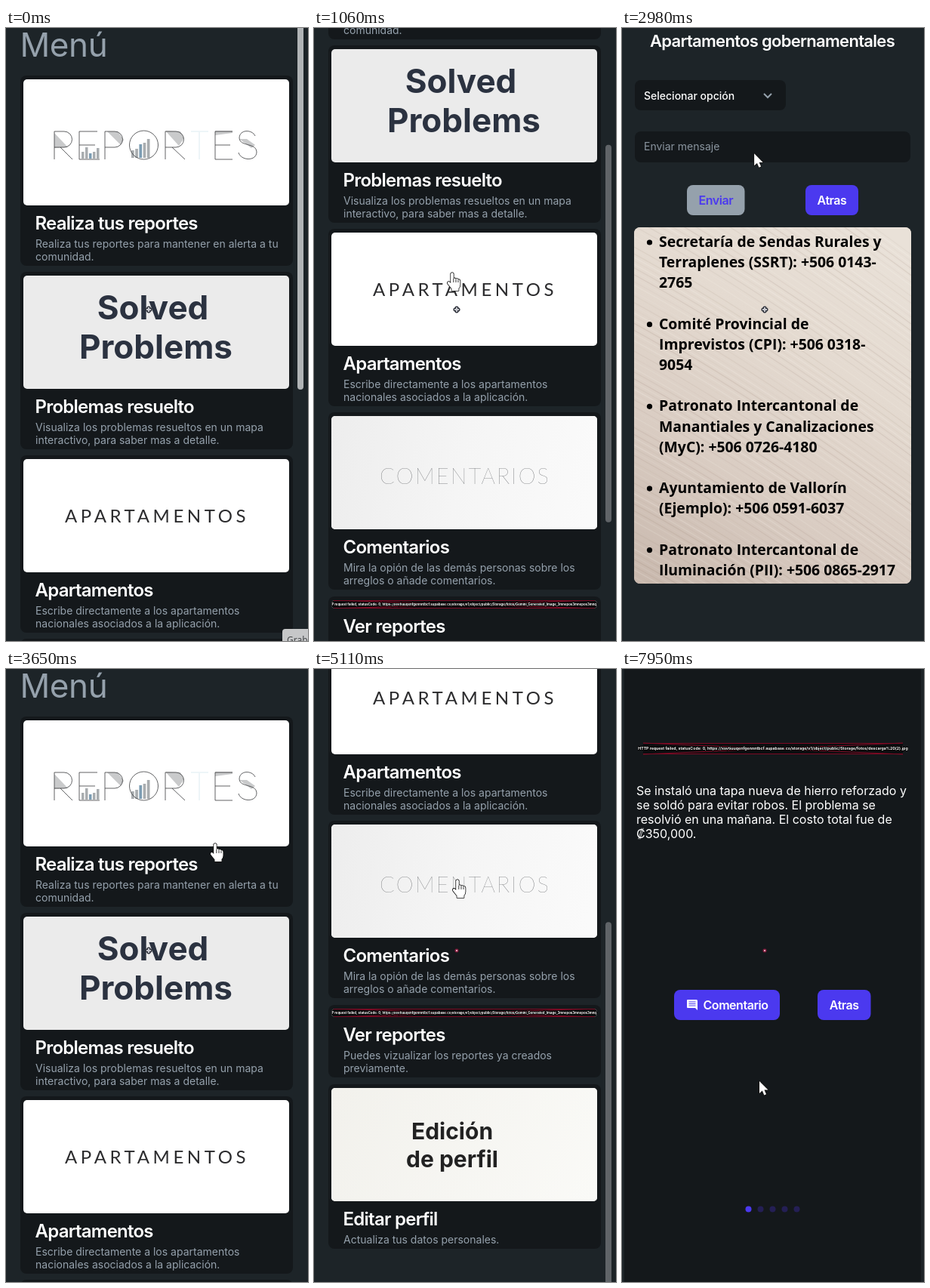
These frames come from a looping animation (400x812 px, 8000 ms). An HTML page with a canvas:

```html
<!DOCTYPE html>
<html lang="es">
<head>
<meta charset="utf-8">
<title>Menú</title>
<style>
html, body { margin: 0; width: 100%; height: 100%; overflow: hidden; background: #1d2428; }
canvas { display: block; }
</style>
</head>
<body>
<canvas id="stage" width="400" height="812"></canvas>
<script>
const ctx = document.getElementById('stage').getContext('2d');
const W = 400, H = 812, LOOP = 8000;
const BG = '#1d2428', CARD = '#14181b', GREY = '#95a1ac', BLUE = '#4b39ef', INK = '#2b3240';
const STORAGE = 'HTTP request failed, statusCode: 0, https://xsvtiuuqenfgennntbcf.supabase.co/storage/v1/object/public/Storage/fotos/';

// Times at which the menu list jumps to a new offset
const SCROLL = [[0, 0], [640, 100], [780, 200], [920, 300], [3650, 0], [3800, 100], [3920, 200],
  [4020, 300], [4140, 400], [4400, 500], [4550, 600], [4620, 608]];

// Pointer path: time, x, y
const PATH = [[470, 420, 600], [760, 190, 350], [850, 183, 324], [1060, 183, 324], [1260, 178, 330],
  [1400, 137, 322], [1590, 165, 340], [2050, 165, 340], [2300, 220, 470], [2500, 110, 420],
  [2710, 45, 333], [2950, 140, 170], [3100, 310, 152], [3260, 277, 231], [3700, 277, 231],
  [4180, 265, 235], [4320, 265, 235], [4700, 240, 250], [5110, 190, 278], [5310, 187, 470],
  [5970, 187, 470], [6170, 72, 172], [6300, 120, 119], [6450, 242, 220], [6620, 235, 450],
  [6760, 178, 678], [7030, 186, 720], [7220, 186, 720], [7500, 190, 650], [7800, 176, 570],
  [7950, 182, 546]];

const CARDS = [
  { y: 68, h: 167, art: reportsArt, title: 'Realiza tus reportes',
    lines: ['Realiza tus reportes para mantener en alerta a tu', 'comunidad.'] },
  { y: 328, h: 150, art: solvedArt, title: 'Problemas resuelto',
    lines: ['Visualiza los problemas resueltos en un mapa', 'interactivo, para saber mas a detalle.'] },
  { y: 571, h: 150, art: officesArt, title: 'Apartamentos',
    lines: ['Escribe directamente a los apartamentos', 'nacionales asociados a la aplicación.'] },
  { y: 814, h: 150, art: commentsArt, title: 'Comentarios',
    lines: ['Mira la opión de las demás personas sobre los', 'arreglos o añade comentarios.'] },
  { y: 1058, h: 11, art: brokenArt, title: 'Ver reportes',
    lines: ['Puedes vizualizar los reportes ya creados', 'previamente.'] },
  { y: 1163, h: 150, art: profileArt, title: 'Editar perfil',
    lines: ['Actualiza tus datos personales.'] }
];

const CONTACTS = [
  ['Secretaría de Sendas Rurales y', 'Terraplenes (SSRT): +506 0143-', '2765'],
  ['Comité Provincial de', 'Imprevistos (CPI): +506 0318-', '9054'],
  ['Patronato Intercantonal de', 'Manantiales y Canalizaciones', '(MyC): +506 0726-4180'],
  ['Ayuntamiento de Vallorín', '(Ejemplo): +506 0591-6037'],
  ['Patronato Intercantonal de', 'Iluminación (PII): +506 0865-2917']
];

const BUTTONS = {
  contacts: [[17, 69, 200, 40], [86, 208, 76.5, 40], [243, 208, 70, 40]],
  report: [[69, 425, 140, 40], [259, 425, 70.5, 40]]
};

const clamp = v => Math.max(0, Math.min(1, v));

function text(s, x, y, size, color, { weight = 400, track = 0, align = 'left', family = 'Inter' } = {}) {
  ctx.font = `${weight} ${size}px "${family}", sans-serif`;
  ctx.letterSpacing = track + 'px';
  ctx.textAlign = align;
  ctx.fillStyle = color;
  ctx.fillText(s, x, y);
}

function box(x, y, w, h, r, fill) {
  ctx.beginPath();
  ctx.roundRect(x, y, w, h, r);
  ctx.fillStyle = fill;
  ctx.fill();
}

function poly(points, fill) {
  ctx.beginPath();
  points.forEach(([x, y]) => ctx.lineTo(x, y));
  ctx.fillStyle = fill;
  ctx.fill();
}

function stroke(d, color, width) {
  ctx.strokeStyle = color;
  ctx.lineWidth = width;
  ctx.stroke(new Path2D(d));
}

function shade(x0, y0, x1, y1, ...colors) {
  const g = ctx.createLinearGradient(x0, y0, x1, y1);
  colors.forEach((c, i) => g.addColorStop(i / (colors.length - 1), c));
  return g;
}

function clipped(x, y, w, h, r, fill, draw) {
  ctx.save();
  box(x, y, w, h, r, fill);
  ctx.clip();
  draw();
  ctx.restore();
}

/* Card artwork; y is the top of the picture */

function bars(x, base, step, heights) {
  heights.forEach((h, i) => {
    ctx.fillStyle = i % 3 === 2 ? '#7d9db3' : '#a9adb0';
    ctx.fillRect(x + i * step, base - h, step - 1.5, h);
  });
}

function reportsArt(y) {
  ctx.save();
  ctx.translate(0, y + 68);
  const grey = '#c9cacb';
  poly([[64, 3], [64, 23], [82, 22]], grey);
  poly([[134, 1], [148, 1], [156, 12], [152, 19]], grey);
  poly([[211, 0], [231, 1], [236, 10], [229, 20]], grey);
  poly([[277, 0], [300, 0], [300, 3], [277, 6]], grey);
  poly([[309, 11], [319, 11], [330, 19], [325, 23]], grey);
  bars(100, 37, 5, [9, 15, 7, 9, 14]);
  bars(166, 36, 5.2, [10, 12, 18, 20, 25]);
  stroke('M256 2V38M245 1H268', '#dcebf1', 1);
  stroke('M64 38V1H77A10.5 10.5 0 0 1 77 22H64M72 22L88 38' +
    'M121 1H97V38M97 19H118M97 38H124' +
    'M131 38V1H144A10.5 10.5 0 0 1 144 22H131' +
    'M163.500 19a19 19 0 1 0 38 0a19 19 0 1 0 -38 0' +
    'M211 38V1H225A10.500 10.500 0 0 1 225 22H211M220 22L237 38' +
    'M300 1H277V38H300M277 19H297' +
    'M330 7C326 -2 309 -2 309 10C309 21 332 16 332 28C332 41 311 40 308 29', '#3a3c3e', 0.8);
  ctx.restore();
}

function solvedArt(y) {
  const style = { weight: 700, align: 'center' };
  text('Solved', 194.5, y + 58, 44, INK, style);
  text('Problems', 198.5, y + 110, 44, INK, style);
}

function officesArt(y) {
  text('APARTAMENTOS', 78, y + 84, 24, '#2c2c2e', { family: 'Lato', track: 4.6 });
}

function commentsArt(y) {
  box(23, y, 352, 150, 0, shade(23, y, 375, y + 60, '#ededed', '#f5f5f5', '#fafafa'));
  text('COMENTARIOS', 87, y + 89.5, 29, '#4b4e52', { family: 'Lato', weight: 200, track: 2.2 });
}

function brokenArt(y) {
  broken(23, y, 352, 11, 4.3, STORAGE + 'Gemini_Generated_Image_3mnepos3mnepos3mnq.png');
}

function profileArt(y) {
  box(23, y, 352, 150, 0, shade(23, y, 375, y + 150, '#f2f1ec', '#fafaf7'));
  const style = { weight: 700, align: 'center' };
  text('Edición', 183, y + 68, 30, '#222', style);
  text('de perfil', 183, y + 105, 30, '#222', style);
}

function broken(x, y, w, h, size, message) {
  box(x, y, w, h, 0, '#0c0d0f');
  const r = x + w, b = y + h;
  stroke(`M${x} ${y + .5}H${r}M${x} ${b - .5}H${r}M${x} ${y}L${r} ${b}M${r} ${y}L${x} ${b}`, '#7d0a24', 1.2);
  const mid = y + h / 2 + size * 0.36;
  ctx.font = `700 ${size}px Inter, sans-serif`;
  ctx.letterSpacing = '0px';
  ctx.textAlign = 'center';
  ctx.strokeStyle = '#000';
  ctx.lineWidth = 1.5;
  ctx.strokeText(message, x + w / 2, mid);
  text(message, x + w / 2, mid, size, '#fff', { weight: 700, align: 'center' });
}

/* Screens */

function fill(color) {
  ctx.fillStyle = color;
  ctx.fillRect(0, 0, W, H);
}

function button(label, [x, y, w, h], color = '#fff', back = BLUE, shift = 0) {
  box(x, y, w, h, 8, back);
  text(label, x + w / 2 + shift, y + 26, 16, color, { weight: 600, track: -0.45, align: 'center' });
}

function menu(t, scroll) {
  fill(BG);
  ctx.save();
  ctx.translate(0, -scroll);
  text('Menú', 18.5, 38, 44, GREY, { track: -0.4 });
  for (const { y, h, art, title, lines } of CARDS) {
    const end = y + h;
    box(19, y - 5, 361, h + 51 + 17 * lines.length, 8, CARD);
    clipped(23, y, 352, h, 5, art === solvedArt ? '#ebebeb' : '#fff', () => art(y));
    text(title, 38.5, end + 32, 24, '#fff', { weight: 600, track: -0.75 });
    lines.forEach((s, i) => text(s, 39, end + 56 + 17 * i, 14, GREY));
  }
  ctx.restore();

  let alpha = t < 3650 ? 1 - clamp((t - 1320) / 270) : 1 - clamp((t - 5180) / 190);
  if (t >= 3650 && t < 3800) alpha = 0;
  ctx.globalAlpha = alpha;
  box(386, -21 + scroll * 0.586, 8, 500, 4, t < 470 ? '#b1b4b6' : '#606468');
  ctx.globalAlpha = 1;

  if (t < 70) {
    box(366, 796, 50, 30, 4, '#c6c7c8');
    text('Grabar', 372, 815, 12, '#45484a', { family: 'Noto Sans' });
  }
}

function fabric() {
  box(16, 264, 367, 472, 0, shade(40, 736, 330, 264, '#c9b9ae', '#dacdc3', '#e4dad0', '#e9e1d8'));
  ctx.lineWidth = 1.4;
  for (let i = 0; i < 150; i++) {
    const y = 60 + i * 4.6;
    const a = 0.05 + 0.045 * Math.sin(i * 2.3) + 0.03 * Math.sin(i * 0.37);
    ctx.strokeStyle = i % 2 ? `rgba(255,250,244,${Math.max(0, a * 1.6)})` : `rgba(120,95,80,${Math.max(0, a)})`;
    ctx.beginPath();
    ctx.moveTo(16, y);
    ctx.quadraticCurveTo(180, y + 90, 383, y + 240);
    ctx.stroke();
  }
}

function contacts() {
  const [, send, back] = BUTTONS.contacts;
  fill(BG);
  text('Apartamentos gobernamentales', 199, 25, 22, '#fff', { weight: 600, track: -0.7, align: 'center' });
  box(17, 69, 200, 40, 8, CARD);
  text('Selecionar opción', 29, 95, 14, '#fff', { weight: 500 });
  stroke('M188 87L193 92L198 87', GREY, 2);
  box(17, 137, 365, 41, 8, CARD);
  text('Enviar mensaje', 29, 162, 14, '#8a959f');
  button('Enviar', send, BLUE, GREY);
  button('Atras', back);
  clipped(16, 264, 367, 472, 8, '#ded3c9', fabric);
  let y = 290;
  for (const lines of CONTACTS) {
    ctx.fillStyle = '#000';
    ctx.beginPath();
    ctx.arc(36.5, y - 6, 3.6, 0, 7);
    ctx.fill();
    for (const s of lines) {
      text(s, 49, y, 19.4, '#000', { weight: 700, family: 'Open Sans' });
      y += 27.17;
    }
    y += 27.17;
  }
}

function report(t) {
  const [comment, back] = BUTTONS.report;
  fill(BG);
  ctx.fillStyle = CARD;
  ctx.fillRect(3, 0, 393, H);
  if (t >= 5710) broken(28, 98, 344, 15, 5.2, STORAGE + 'descarga%20(2).jpg');
  ['Se instaló una tapa nueva de hierro reforzado y', 'se soldó para evitar robos. El problema se',
    'resolvió en una mañana. El costo total fue de', '₡350,000.']
    .forEach((s, i) => text(s, 19, 167 + 19 * i, 16, '#fff'));
  button('Comentario', comment, '#fff', BLUE, 11.5);
  ctx.fillStyle = '#fff';
  ctx.fill(new Path2D('M87 438H98.500Q100 438 100 439.500V452L97 449H87Q86 449 86 448V439Q86 438 87 438Z'));
  stroke('M88.500 441H97.500M88.500 443.500H97.500M88.500 446H97.500', BLUE, 1.1);
  button('Atras', back);
  for (let i = 0; i < 5; i++) {
    ctx.fillStyle = i ? '#241f55' : BLUE;
    ctx.beginPath();
    ctx.arc(167.5 + 16 * i, 715.5, 4, 0, 7);
    ctx.fill();
  }
}

/* Pointer and capture mark */

const ARROW = new Path2D('M0 0V16L3.800 12.600L6.300 18.500L9 17.300L6.500 11.600H11.500Z');
const HAND = new Path2D('M-1.800 1.500Q0 -1.500 1.800 1.500V8Q3.500 6.500 5 8.500Q6.500 7.300 8 9.300' +
  'Q10.500 8.500 10.500 11.500V16Q10.500 19 8.500 21V24H-0.500V21.500L-6 14.500Q-6.500 11.500 -4 12L-1.800 14Z');

function pointer(x, y, hand) {
  ctx.save();
  ctx.translate(x, y);
  ctx.lineJoin = 'round';
  ctx.lineWidth = 1.6;
  ctx.strokeStyle = '#111';
  ctx.fillStyle = '#fff';
  const shape = hand ? HAND : ARROW;
  ctx.stroke(shape);
  ctx.fill(shape);
  if (hand) stroke('M1.800 8V13M5 8.500V13M8 9.500V13', '#222', 0.9);
  ctx.restore();
}

function mark(light) {
  if (light) {
    box(184.5, 370.5, 9, 5, 2, '#33363f');
    box(186.5, 368.5, 5, 9, 2, '#33363f');
    box(186, 372, 6, 2, 0, '#c4c5cb');
    box(188, 370, 2, 6, 0, '#c4c5cb');
  } else {
    box(186.5, 370.5, 5, 5, 2, '#7c1c3c');
    box(188, 372, 2, 2, 0, '#f0a0b4');
  }
}

function pointerAt(t) {
  if (t < PATH[0][0]) return null;
  const i = PATH.findIndex(p => p[0] > t);
  if (i < 0) return PATH.at(-1).slice(1);
  const [t0, x0, y0] = PATH[i - 1], [t1, x1, y1] = PATH[i];
  const k = (t - t0) / (t1 - t0);
  return [x0 + (x1 - x0) * k, y0 + (y1 - y0) * k];
}

const inside = (x, y, [bx, by, w, h]) => x >= bx && x <= bx + w && y >= by && y <= by + h;

function draw(t) {
  const scene = t < 1920 ? 'menu' : t < 3650 ? 'contacts' : t < 5640 ? 'menu' : 'report';
  const scroll = SCROLL.findLast(s => s[0] <= t)[1];
  let targets = BUTTONS[scene], light = scene === 'contacts';
  if (scene === 'menu') {
    menu(t, scroll);
    targets = CARDS.map(c => [19, c.y - 5 - scroll, 361, c.h + 51 + 17 * c.lines.length]);
    light = CARDS.some(c => inside(189, 373 + scroll, [23, c.y, 352, c.h]));
  } else if (scene === 'contacts') contacts();
  else report(t);
  mark(light);
  const p = pointerAt(t);
  if (p) pointer(p[0], p[1], targets.some(b => inside(p[0], p[1], b)));
}

const start = performance.now();
function tick() {
  draw((performance.now() - start) % LOOP);
  requestAnimationFrame(tick);
}
tick();
</script>
</body>
</html>
```
